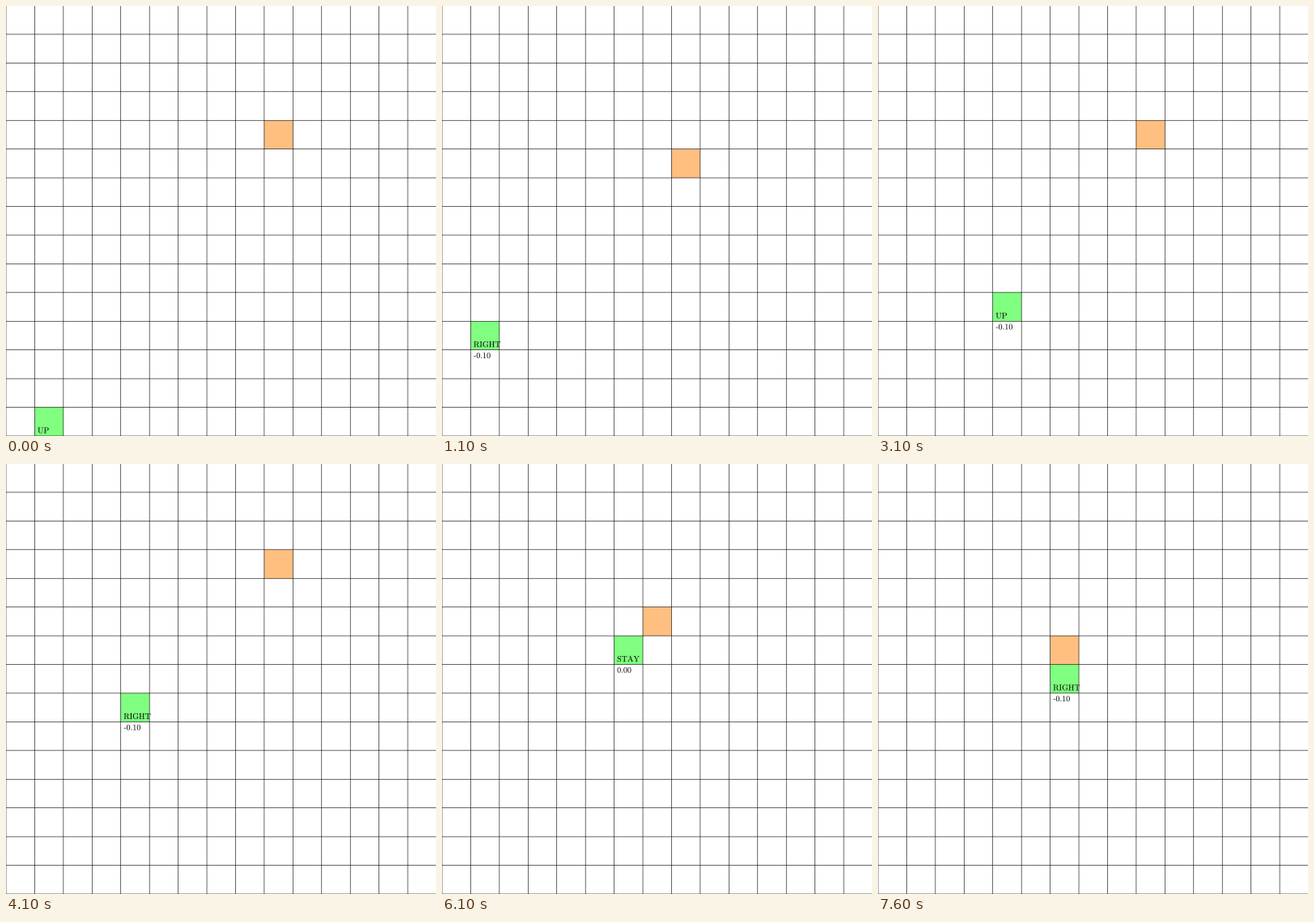
A matplotlib script that plays this animation: 531 by 531 pixels, repeating every 8000 ms.

```python
import matplotlib.pyplot as plt
import numpy as np
from matplotlib.animation import FuncAnimation
from matplotlib.patches import PathPatch, Rectangle
from matplotlib.textpath import TextPath
from matplotlib.transforms import Affine2D

plt.rcParams["mathtext.fontset"] = "cm"

SIZE, DPI = 531, 100
CELL, PAD = 35.433, 3.53
LINE_PX = 0.6
FRAMES, INTERVAL, HOLD = 80, 100, 5

MOVES = {"U": (0, 1), "D": (0, -1), "L": (-1, 0), "R": (1, 0), "S": (0, 0)}
NAMES = {"U": "UP", "D": "DOWN", "R": "RIGHT", "S": "STAY"}
AGENT = "UUUURRUURURUSSDR"
AGENT = "UUURURRUURURUSSDR"
GOAL = "SLDUDRUUSLDLDSDL"


def walk(start, moves):
    """Cells visited from start, counted from the bottom left."""
    steps = [MOVES[m] for m in moves]
    return np.cumsum([start] + steps, axis=0)


def label(text):
    # a true hyphen keeps the sign short
    text = text.replace("-", "\u2010")
    return TextPath((0, 0), rf"$\mathrm{{{text}}}$", size=10)


agent_path = walk((1, 0), AGENT)
goal_path = walk((9, 10), GOAL)
action_glyphs = {key: label(name) for key, name in NAMES.items()}
cost_glyphs, zero_glyphs = label("-0.10"), label("0.00")

fig = plt.figure(figsize=(SIZE / DPI, SIZE / DPI), dpi=DPI, facecolor="white")
ax = fig.add_axes([0, 0, 1, 1])
ax.set(xlim=(0, SIZE), ylim=(0, SIZE))
ax.axis("off")

# thin lines keep their fractional places, so no snapping to pixels
lines = np.arange(15) * CELL
style = dict(colors="black", linewidths=LINE_PX * 72 / DPI, snap=False, zorder=2)
ax.vlines(lines, 0, SIZE, **style)
ax.hlines(lines, 0, SIZE, **style)


def add_square(color):
    return ax.add_patch(Rectangle((0, 0), CELL, CELL, fc=color, lw=0,
                                  snap=False, zorder=1))


def add_text():
    return ax.add_patch(PathPatch(zero_glyphs, fc="black", lw=0,
                                  snap=False, zorder=3))


goal, agent = add_square("#ffbf80"), add_square("#80ff80")
action, reward = add_text(), add_text()


def place_text(patch, path, cell, dy):
    x, y = cell * CELL
    patch.set_path(path)
    patch.set_transform(Affine2D().translate(x + PAD, y + dy) + ax.transData)


def update(i):
    step = (i + HOLD - 1) // HOLD
    key, cell = AGENT[step], agent_path[step]
    goal.set_xy(goal_path[step] * CELL)
    agent.set_xy(cell * CELL)
    place_text(action, action_glyphs[key], cell, PAD)
    place_text(reward, zero_glyphs if key == "S" else cost_glyphs, cell, -10.1)
    reward.set_visible(step > 0)
    return goal, agent, action, reward


anim = FuncAnimation(fig, update, frames=FRAMES, interval=INTERVAL,
                     repeat=True, repeat_delay=0, blit=False)
plt.show()
```
